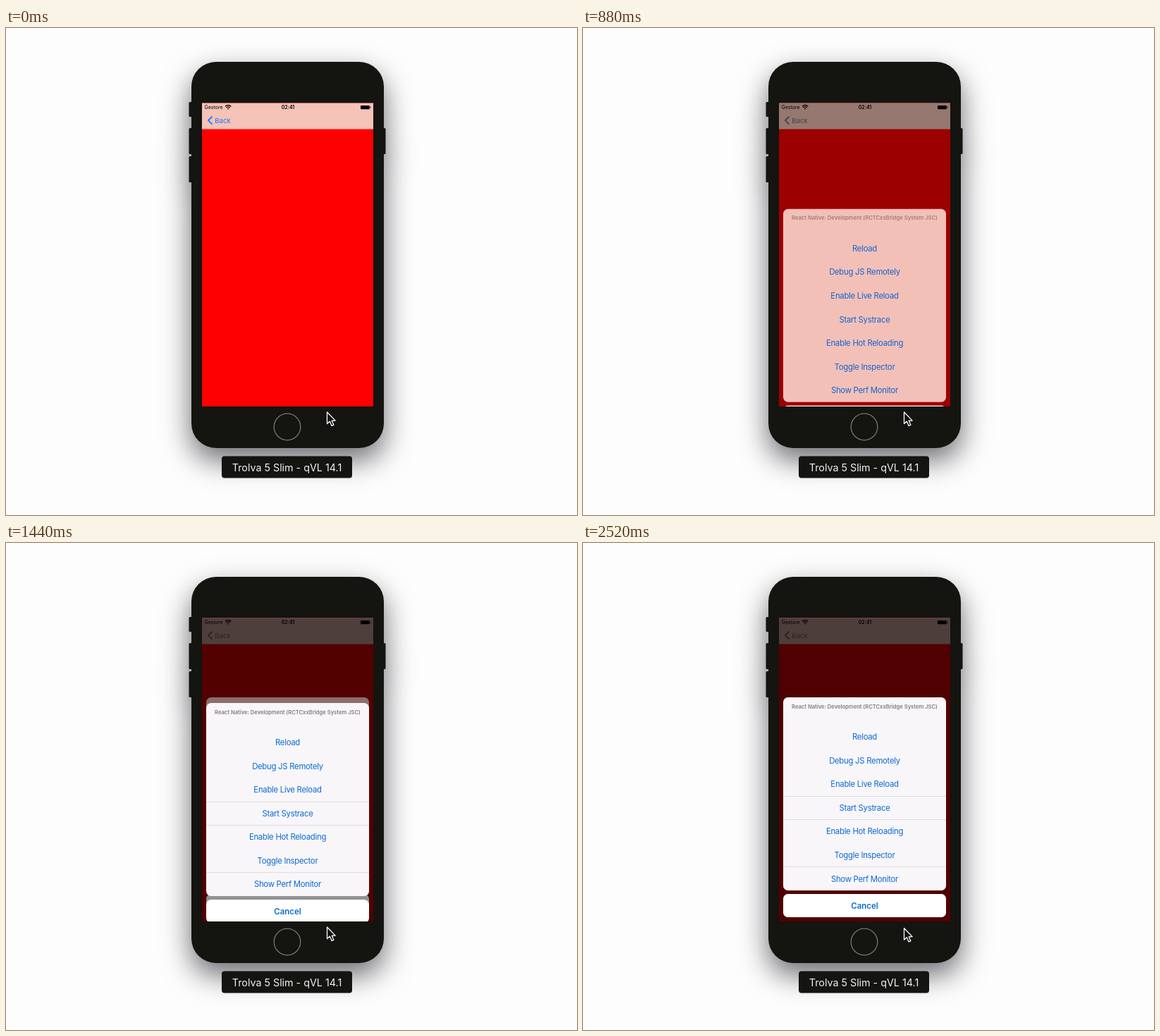
Recreate the animation shown at these times as an HTML page. Size 810x691 px, loop 2.56 s.

```html
<!DOCTYPE html>
<html lang="en">
<head>
<meta charset="utf-8">
<style>
  html, body { margin: 0; width: 100%; height: 100%; overflow: hidden; background: #fdfdfd; }
  svg { display: block; width: 810px; height: 691px; font-family: Inter, "Open Sans", sans-serif; }
  .device { filter: drop-shadow(0 17px 20px rgba(0, 0, 10, .58)); }
  .sheet { text-anchor: middle; }
  .title { font-size: 7.6px; font-weight: 600; }
  .action { font-size: 11.3px; letter-spacing: -.25px; }
  .cancel { font-size: 11.4px; font-weight: 600; }
</style>
</head>
<body>
<svg viewBox="0 0 810 691">
  <defs><clipPath id="screen"><rect x="278" y="106.5" width="243" height="430.5"/></clipPath></defs>

  <g class="device" fill="#141410">
    <rect x="259.5" y="105" width="8" height="21" rx="1.5"/>
    <rect x="259.5" y="142" width="8" height="37" rx="1.5"/>
    <rect x="259.5" y="182" width="8" height="37" rx="1.5"/>
    <rect x="531" y="142" width="7.5" height="37" rx="1.5"/>
    <rect x="263" y="48" width="273" height="548" rx="35"/>
  </g>
  <circle cx="399" cy="566" r="18.8" fill="none" stroke="#77756e" stroke-width="1.3"/>
  <rect x="306" y="607.5" width="185" height="31" rx="4" fill="#141410"/>
  <text x="398.5" y="629" font-size="14.3" fill="#f2f2f2" text-anchor="middle">Trolva 5 Slim - qVL 14.1</text>

  <g clip-path="url(#screen)">
    <rect x="278" y="106" width="243" height="432" fill="#fe0000"/>
    <rect x="278" y="106" width="243" height="37.5" fill="#f5c3b8"/>
    <g font-size="7">
      <text x="281.5" y="115">Gestore</text>
      <text x="400" y="115" font-weight="600" text-anchor="middle">02:41</text>
    </g>
    <g fill="none" stroke="#000" stroke-width="1.3">
      <path d="M311 111.2q4.2-3.6 8.4 0M312.6 113q2.6-2.2 5.2 0"/>
      <path d="M314.2 114.7h2"/>
    </g>
    <rect x="503" y="110" width="12.8" height="5.2" rx="1"/>
    <rect x="516.4" y="111.6" width="1" height="2"/>
    <g id="back">
      <path d="M292.5 125.5l-5.6 5.6 5.6 5.6" fill="none" stroke="currentColor" stroke-width="1.8"/>
      <text x="296.3" y="134.6" font-size="9.6" fill="currentColor">Back</text>
    </g>
    <g id="sheets"></g>
  </g>

  <path id="cursor" d="M455.5 545v16.6l3.8-3.5 2.8 6.3 2.8-1.2-2.7-6.1h5z"
        fill="#111" stroke="#fff" stroke-width="1.3" stroke-linejoin="round"/>
</svg>
<script>
const LOOP = 2560, FRAME = 40, REST = 219, TRAVEL = 318, DIM = 0.44, SPRING = 0.021;
const actions = ["Reload", "Debug JS Remotely", "Enable Live Reload", "Start Systrace",
  "Enable Hot Reloading", "Toggle Inspector", "Show Perf Monitor"];
const sheets = [
  { start: 705, fill: "#f3c0b8", title: "#a07d7c", tint: "#1264d0", line: "#bb6660", rules: [39, 73, 140, 173, 240] },
  { start: 1175, fill: "#f9f6f9", title: "#7f7d86", tint: "#0a6ad4", line: "#dfdce1", rules: [140, 173, 240] }
];

const label = (cls, y, fill, text) => `<text class="${cls}" x="399.5" y="${y}" fill="${fill}">${text}</text>`;
const card = (y, height, fill) => `<rect x="284" y="${y}" width="231" height="${height}" rx="7" fill="${fill}"/>`;

const sheetMarkup = s => `
  <rect class="dim" x="278" y="106" width="243" height="432"/>
  <g class="sheet">
    ${card(0, 274, s.fill)}
    <g class="rules">${s.rules.map(y => `<rect x="284" y="${y}" width="231" height="1" fill="${s.line}"/>`).join("")}</g>
    ${label("title", 15.8, s.title, "React Native: Development (RCTCxxBridge System JSC)")}
    ${actions.map((a, i) => label("action", 60.2 + 33.55 * i, s.tint, a)).join("")}
    ${card(279, 33, "#fff")}
    ${label("cancel", 299.7, s.tint, "Cancel")}
  </g>`;

const byId = id => document.getElementById(id);
byId("sheets").innerHTML = sheets.map(sheetMarkup).join("");
const dims = document.querySelectorAll(".dim");
const panels = document.querySelectorAll(".sheet");
const rules = document.querySelectorAll(".rules");

// Critically damped spring: share of the way still to go.
function remaining(ms) {
  const x = Math.max(0, ms) * SPRING;
  return Math.exp(-x) * (1 + x);
}

const mix = (a, b, p) => `rgb(${a.map((v, i) => Math.round(v + (b[i] - v) * p))})`;

function draw(now) {
  const t = Math.floor(now % LOOP / FRAME) * FRAME;
  sheets.forEach((s, i) => {
    const left = remaining(t - s.start);
    dims[i].setAttribute("opacity", DIM * (1 - left));
    panels[i].setAttribute("transform", `translate(0 ${REST + TRAVEL * left})`);
    rules[i].setAttribute("opacity", left < 0.03 ? 1 : 0);
  });
  byId("back").style.color = mix([20, 122, 255], [115, 108, 106], 1 - remaining(t - sheets[0].start));
  byId("cursor").setAttribute("transform", `translate(0 ${t >= 2440 ? 1.5 : 0})`);
  requestAnimationFrame(() => draw(performance.now()));
}
draw(performance.now());
</script>
</body>
</html>
```
